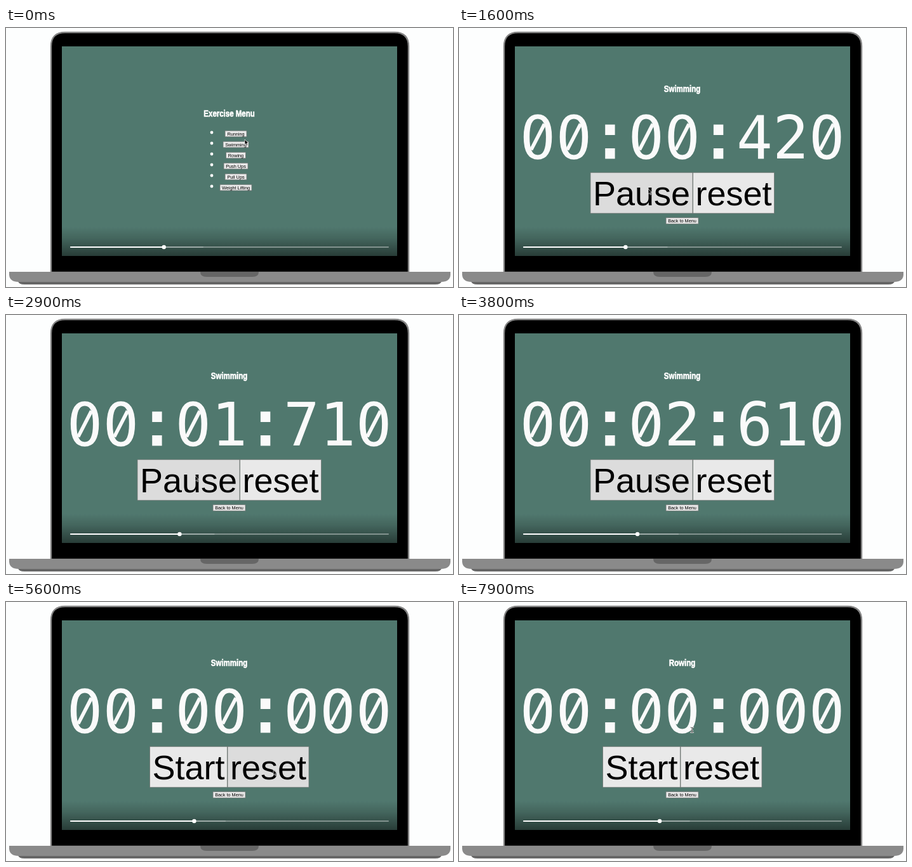
Write an HTML page that moves like this. It is 704 px wide and 409 px high and loops after 8000 ms.

```html
<!DOCTYPE html>
<html lang="en">
<head>
<meta charset="utf-8">
<title>Exercise timer</title>
<style>
  html, body { margin: 0; width: 100%; height: 100%; overflow: hidden; background: #fdfefe; }
  svg { display: block; width: 704px; height: 409px; }
  text { font-family: "Liberation Sans", Arial, sans-serif; }
  .title { font-weight: bold; font-size: 15.5px; fill: #fff; stroke: #fff; stroke-width: .7; text-anchor: middle; }
  .button rect { fill: #e9e9e9; stroke: #6f7573; stroke-width: .8; }
  .button.hover rect { fill: #dcdcdc; }
  .button text { fill: #000; text-anchor: middle; }
  .digit { font: 94.5px "DejaVu Sans Mono", monospace; fill: #fafafa; }
  .pointer { fill: #000; stroke: #fff; stroke-width: .7; stroke-linejoin: round; }
</style>
</head>
<body>
<svg viewBox="0 0 704 409">
  <defs>
    <linearGradient id="shade" x1="0" y1="0" x2="0" y2="1">
      <stop offset="0" stop-opacity="0"/>
      <stop offset=".4" stop-opacity=".16"/>
      <stop offset="1" stop-opacity=".5"/>
    </linearGradient>
    <!-- slashed zero in font units, 2048 per em -->
    <g id="zero" transform="scale(.04614 -.04614)" fill="#fafafa">
      <path fill-rule="evenodd" d="M616 1520Q853 1520 975 1325Q1098 1130 1098 745Q1098 361 975 166Q853 -29 616 -29Q379 -29 257 166Q135 361 135 745Q135 1130 257 1325Q379 1520 616 1520Z
        M616 1362Q760 1362 828 1209Q896 1057 896 745Q896 434 828 281Q760 129 616 129Q473 129 405 281Q337 434 337 745Q337 1057 405 1209Q473 1362 616 1362Z"/>
      <path d="M335 330L445 280L900 1160L790 1215Z"/>
    </g>
  </defs>

  <rect width="704" height="409" fill="#fdfefe"/>
  <path d="M71 386V29Q71 7 93 7H612Q634 7 634 29V386Z" fill="#000" stroke="#858585" stroke-width="2.4"/>
  <path d="M19 400H686Q685 405 676 405H29Q20 405 19 400Z" fill="#666"/>
  <path d="M5 385H700V390Q699 401 685 401H20Q6 401 5 390Z" fill="#8a8a8a"/>
  <path d="M306 385H398Q398 393 388 393H316Q306 393 306 385Z" fill="#666"/>
  <rect x="88" y="29" width="528" height="331" fill="#50786e"/>

  <g id="menu"></g>
  <g id="timer"><g id="clock"></g></g>

  <rect x="88" y="314" width="528" height="46" fill="url(#shade)"/>
  <g fill="#fff">
    <rect x="101" y="345" width="502" height="2" rx="1" opacity=".38"/>
    <rect id="buffer" x="101" y="345" height="2" rx="1" opacity=".22"/>
    <rect id="played" x="101" y="345" height="2" rx="1"/>
    <circle id="knob" cy="346" r="3.2"/>
  </g>
  <path id="arrow" class="pointer" d="M0 0V8.2L1.9 6.5L3.2 9.4L4.6 8.8L3.3 6H5.9Z"/>
  <g id="beam" fill="none" stroke-linecap="round">
    <path d="M-2 -4Q0 -4 0 -3Q0 -4 2 -4M0 -3V3M-2 4Q0 4 0 3Q0 4 2 4M-1 1H1" stroke="#fff" stroke-width="1.8"/>
    <path d="M-2 -4Q0 -4 0 -3Q0 -4 2 -4M0 -3V3M-2 4Q0 4 0 3Q0 4 2 4M-1 1H1" stroke="#222" stroke-width=".8"/>
  </g>
</svg>
<script>
const LOOP = 8000, TICK = 100;
const OPEN = 450, START = 1177, PAUSE = 4250, RESET = 5100, BACK = 6650, REOPEN = 7550;

// pointer stops: time, x, y
const PATH = [
  [0, 376, 176], [250, 372, 184], [500, 372, 184], [1000, 298, 254], [3300, 298, 254],
  [3700, 313, 252], [4400, 313, 252], [4900, 421, 265], [5800, 421, 265], [6300, 354, 304],
  [6700, 354, 304], [7100, 361, 169], [7400, 362, 201], [7700, 362, 201], [7900, 367, 202]
];

const $ = id => document.getElementById(id);
const menu = $("menu"), timer = $("timer"), clock = $("clock");

function add(parent, tag, attrs, content = "") {
  const el = document.createElementNS("http://www.w3.org/2000/svg", tag);
  for (const k in attrs) el.setAttribute(k, attrs[k]);
  el.textContent = content;
  return parent.appendChild(el);
}

const show = (el, on) => el.setAttribute("visibility", on ? "inherit" : "hidden");

// one condensed heavy style for all headings
function title(parent, label, y) {
  return add(parent, "text", { class: "title", transform: `translate(351.5 ${y}) scale(.74 1)` }, label);
}

const buttons = [];
function button(parent, label, cx, cy, w, h, size) {
  const el = add(parent, "g", { class: "button" });
  const rect = add(el, "rect", { x: -w / 2, y: -h / 2, width: w, height: h });
  const text = add(el, "text", { y: size * .36, "font-size": size }, label);
  const b = { el, rect, text, cx, cy, w, h, parent };
  buttons.push(b);
  place(b, cx, w);
  return b;
}

function place(b, cx, w) {
  b.cx = cx;
  b.w = w;
  b.rect.setAttribute("x", -w / 2);
  b.rect.setAttribute("width", w);
  b.el.setAttribute("transform", `translate(${cx} ${b.cy})`);
}

title(menu, "Exercise Menu", 139.7);
[["Running", 34], ["Swimming", 40], ["Rowing", 31], ["Push Ups", 38], ["Pull Ups", 34], ["Weight Lifting", 50]]
  .forEach(([label, w], i) => {
    add(menu, "circle", { cx: 324, cy: 165 + 17 * i, r: 2.4, fill: "#fff" });
    button(menu, label, 362, 167 + 17 * i, w, 9.6, 7.3);
  });

const heading = title(timer, "", 101.3);
const toggle = button(timer, "Start", 287.5, 260.5, 122, 64.5, 54);
const reset = button(timer, "reset", 413, 260.5, 128, 64.5, 54);
button(timer, "Back to Menu", 351.5, 304.5, 51, 9.6, 7.3);

const cells = Array.from({ length: 9 }, (_, i) => {
  const x = 95.6 + 56.9 * i;
  if (i % 3 === 2 && i < 6) {
    for (const y of [152.5, 190]) add(clock, "rect", { x: x + 20.8, y, width: 15.4, height: 16.5, fill: "#fafafa" });
    return null;
  }
  return {
    zero: add(clock, "use", { href: "#zero", x, y: 206.4 }),
    text: add(clock, "text", { class: "digit", x, y: 206.4 })
  };
});

function setClock(ms) {
  const pad = (n, len) => String(n).padStart(len, "0");
  const s = `${pad(Math.floor(ms / 60000), 2)}:${pad(Math.floor(ms / 1000) % 60, 2)}:${pad(ms % 1000, 3)}`;
  cells.forEach((cell, i) => {
    if (!cell) return;
    show(cell.zero, s[i] === "0");
    cell.text.textContent = s[i] === "0" ? "" : s[i];
  });
}

function elapsed(t) {
  if (t < START || t >= RESET) return 0;
  return Math.floor((Math.min(t, PAUSE) - START) * .9957 / 10) * 10;
}

function pointerAt(t) {
  const i = PATH.findIndex(p => p[0] > t);
  if (i < 0) return PATH[PATH.length - 1].slice(1);
  const [t0, x0, y0] = PATH[i - 1], [t1, x1, y1] = PATH[i];
  const u = (t - t0) / (t1 - t0), e = u * u * (3 - 2 * u);
  return [x0 + (x1 - x0) * e, y0 + (y1 - y0) * e];
}

function draw(t) {
  const inMenu = t < OPEN || (t >= BACK && t < REOPEN);
  const running = t >= START && t < PAUSE;
  show(menu, inMenu);
  show(timer, !inMenu);
  heading.textContent = t < BACK ? "Swimming" : "Rowing";
  toggle.text.textContent = running ? "Pause" : "Start";
  place(toggle, 287.5, running ? 161 : 122);
  place(toggle, running ? 287.5 : 287.5, toggle.w);
  place(reset, running ? 432.5 : 413, 128);
  setClock(elapsed(t));

  const [x, y] = pointerAt(t);
  const screen = inMenu ? menu : timer;
  for (const b of buttons) {
    const over = b.parent === screen && Math.abs(x - b.cx) < b.w / 2 && Math.abs(y - b.cy) < b.h / 2;
    b.el.classList.toggle("hover", over);
  }
  const onText = !inMenu && y > 115 && y < 227;
  for (const [id, on] of [["arrow", !onText], ["beam", onText]]) {
    show($(id), on);
    $(id).setAttribute("transform", `translate(${x} ${y})`);
  }

  const knobX = 248.7 + t * .00852;
  const loaded = 311 + 17.6 * [900, 3300, 6100].filter(at => t >= at).length;
  $("played").setAttribute("width", knobX - 101);
  $("knob").setAttribute("cx", knobX);
  $("buffer").setAttribute("width", loaded - 101);
}

const begin = performance.now();
function frame() {
  const t = (performance.now() - begin) % LOOP;
  draw(Math.floor(t / TICK) * TICK);
  requestAnimationFrame(frame);
}
frame();
</script>
</body>
</html>
```
